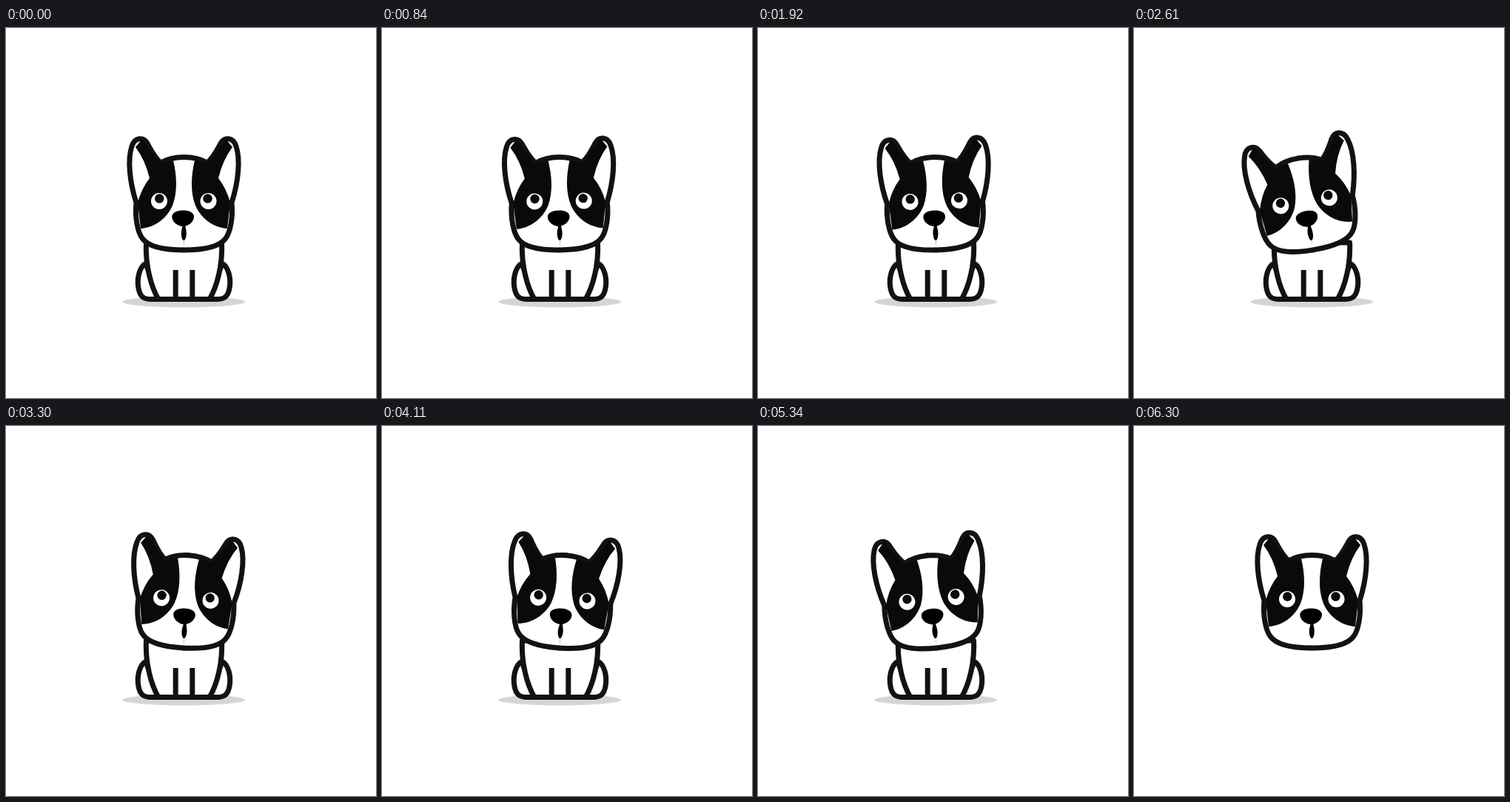
These frames come from a looping animation (500x500 px, 6.33 s). An HTML page:

```html
<!DOCTYPE html>
<html lang="en">
<head>
<meta charset="utf-8">
<title>Puppy</title>
<style>
  html, body { margin: 0; width: 100%; height: 100%; overflow: hidden; background: #fff; }
  svg { display: block; width: 100%; height: 100%; }
  .line { fill: #fff; stroke: #141112; stroke-width: 7; stroke-linecap: round; stroke-linejoin: round; }
  .open { fill: none; stroke-linecap: butt; }
</style>
</head>
<body>
<svg viewBox="0 0 500 500">
  <defs>
    <g id="flank">
      <path class="line" d="M189 318C180 323 176 340 179.500 354C182 364 187 366.500 196 366.500H206Z"/>
    </g>
    <g id="chest">
      <path class="line" d="M240.500 290H189.500C188 320 196 350 206 366.500H240.500" stroke="none"/>
      <path class="line open" d="M229.200 327V366"/>
    </g>
    <g id="skull">
      <path class="line" d="M240.500 174.500C227 174.500 218 177 209 182C200 174 196 165 191 156C186 147 174 147 170 160C164 178 167 208 176 236C174 256 178 276 184 284C193 297 216 300 240.500 300"/>
      <path fill="#0b090a" d="M226 179C231 200 232 222 225 240C217 258 200 270 182 271L178 236Q183 217 194 203Q188 178 175 161L184 150L208 183Z"/>
    </g>
  </defs>
  <g id="body">
    <ellipse cx="240.300" cy="370" rx="83" ry="7.500" fill="#d8d4d4"/>
    <use href="#flank"/>
    <use href="#flank" transform="translate(481) scale(-1 1)"/>
    <use href="#chest"/>
    <use href="#chest" transform="translate(481) scale(-1 1)"/>
  </g>
  <g id="head">
    <use href="#skull"/>
    <use href="#skull" transform="translate(481) scale(-1 1)"/>
    <g fill="#fff">
      <circle cx="207" cy="234" r="11"/>
      <circle cx="273.500" cy="234" r="11"/>
    </g>
    <g fill="#0b090a">
      <circle cx="207.300" cy="230.500" r="6.200"/>
      <circle cx="272.500" cy="230.500" r="6.200"/>
    </g>
    <path d="M224.300 255C224.300 249 232 246.500 239.500 246.500C247 246.500 254 249 254 255C254 262 246 268 239.500 268C232 268 224.300 262 224.300 255Z"/>
    <path d="M239 264H242C242 269 243.800 272 243.800 277C243.800 283 242 287 240.300 287C238.500 287 236.800 283 236.800 277C236.800 272 239 269 239 264Z"/>
  </g>
</svg>
<script>
  const LOOP = 6330, STEP = 30, LEFT = -9.5, RIGHT = 8;
  // Head tilt keys: time in ms, angle in degrees
  const keys = [
    [0, 0], [600, LEFT], [1080, RIGHT], [1560, LEFT], [2050, 0], [2520, LEFT],
    [2990, LEFT], [3470, RIGHT], [3960, RIGHT], [4440, LEFT], [4990, LEFT],
    [5810, 0], [LOOP, 0]
  ];
  const head = document.getElementById('head');
  const body = document.getElementById('body');
  const ease = p => (1 - Math.cos(Math.PI * p)) / 2;

  function tilt(t) {
    const i = keys.findIndex(k => k[0] > t);
    const [t0, a] = keys[i - 1], [t1, b] = keys[i];
    return a + (b - a) * ease((t - t0) / (t1 - t0));
  }

  const start = performance.now();
  function draw() {
    const elapsed = (performance.now() - start) % LOOP;
    const t = Math.floor(elapsed / STEP) * STEP;
    head.setAttribute('transform', `rotate(${tilt(t)} 240.500 290)`);
    // The body blinks out for the last step of the loop
    body.style.visibility = t >= LOOP - STEP ? 'hidden' : 'visible';
    requestAnimationFrame(draw);
  }
  draw();
</script>
</body>
</html>
```
